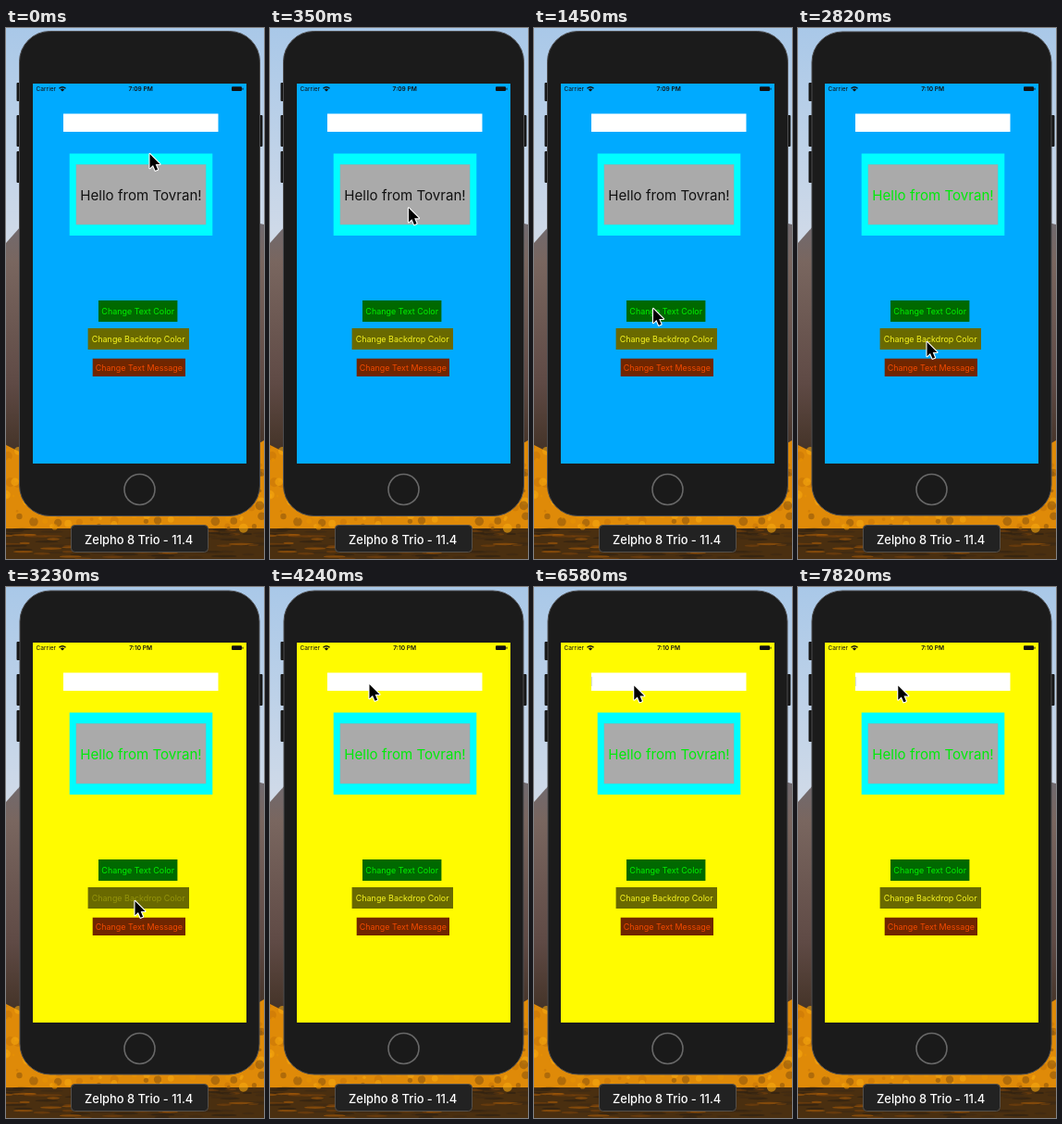
These frames come from a looping animation (279x573 px, 8 s). An HTML page:

```html
<!DOCTYPE html>
<html lang="en">
<head>
<meta charset="utf-8">
<title>Button demo</title>
<style>
  html, body { margin: 0; width: 100%; height: 100%; overflow: hidden; }
  svg { display: block; width: 279px; height: 573px; }
  text { font-family: Inter, "Open Sans", sans-serif; text-anchor: middle; }
  .button { font-size: 8.95px; }
  .status { font-size: 6.6px; }
</style>
</head>
<body>
<svg viewBox="0 0 279 573">
  <defs>
    <linearGradient id="sky" x2="0" y2="1">
      <stop offset="0" stop-color="#a9c8e8"/>
      <stop offset=".4" stop-color="#d0dae8"/>
    </linearGradient>
    <linearGradient id="hills" x2="0" y2="1">
      <stop offset="0" stop-color="#696d7b"/>
      <stop offset=".25" stop-color="#79665f"/>
      <stop offset=".7" stop-color="#5f4a45"/>
      <stop offset="1" stop-color="#3f2f22"/>
    </linearGradient>
  </defs>

  <rect width="279" height="573" fill="url(#sky)"/>
  <path d="M0 232L16 214L140 180L279 212V470H0Z" fill="url(#hills)"/>
  <path d="M0 450L16 458L260 456L279 445V573H0Z" fill="#df8a08"/>
  <rect y="540" width="279" height="33" fill="#4a2f10"/>
  <g id="foliage"></g>

  <g fill="#161616">
    <rect x="11.5" y="59" width="5" height="20" rx="1"/>
    <rect x="11.5" y="94" width="5" height="34" rx="1"/>
    <rect x="11.5" y="133" width="5" height="34" rx="1"/>
    <rect x="273" y="94" width="4.5" height="34" rx="1"/>
  </g>
  <rect id="body" rx="33" fill="#1b1b1b" stroke="#4c4c4e"/>
  <circle cx="144.5" cy="498" r="16.5" fill="#1a1a1a" stroke="#686868" stroke-width="1.6"/>

  <rect id="screen" x="29" y="60" width="231" height="410"/>
  <g class="status" fill="#111">
    <text x="32.5" y="68.3" style="text-anchor:start">Carrier</text>
    <text id="clock" x="145.7" y="68.3" font-weight="600"></text>
    <path d="M57 64.8Q61 61.4 65 64.8L64 65.8Q61 63.4 58 65.8ZM58.8 66.5Q61 64.7 63.2 66.5L61 68.6Z"/>
    <rect x="244" y="63.3" width="11" height="4.8" rx="1"/>
    <rect x="255.5" y="64.7" width="1" height="2"/>
  </g>

  <rect x="62" y="92.5" width="167.5" height="19.5" fill="#fff"/>
  <rect id="caret" x="62" y="97" width="1" height="10" fill="#7d96dc"/>

  <rect x="68.7" y="135.5" width="154.6" height="88.5" fill="#00fdff"/>
  <rect x="76" y="147.5" width="140" height="64.5" fill="#aaa" stroke="#8fb0b0" stroke-width=".6"/>
  <text id="hello" x="146" y="186" font-size="15.1">Hello from Tovran!</text>

  <g class="button">
    <rect x="100" y="294" width="85.4" height="23" fill="#006900"/>
    <text id="textButton" x="142.7" y="309.3" fill="#00f000">Change Text Color</text>
    <rect x="88.6" y="324" width="109.4" height="23" fill="#696900"/>
    <text id="backdropButton" x="143.2" y="339.3" fill="#f8f520">Change Backdrop Color</text>
    <rect x="93.7" y="356.7" width="100.3" height="19.3" fill="#702600"/>
    <text x="143.8" y="369.8" fill="#f24a00">Change Text Message</text>
  </g>

  <rect x="70.5" y="536.5" width="148" height="29" rx="4" fill="#222" stroke="#55504a"/>
  <text x="143.7" y="556.5" font-size="12.9" font-weight="500" fill="#fff">Zelpho 8 Trio - 11.4</text>

  <path id="pointer" d="M0 0V15.2L3.5 12 6 17.8 8.6 16.7 6.2 11H11Z" stroke="#fff" stroke-width="2.2" stroke-linejoin="round" paint-order="stroke"/>
</svg>
<script>
const LOOP = 8000;
const TEXT_CLICK = 1860, BACKDROP_CLICK = 3230, CARET_START = 6580;
const el = id => document.getElementById(id);
const set = (id, attrs) => {
  for (const name in attrs) el(id).setAttribute(name, attrs[name]);
};

const start = [155.5, 136];
const moves = [
  { from: 80, to: 790, at: [138.5, 315] },
  { from: 790, to: 1040, at: [118.5, 303] },
  { from: 1270, to: 1450, at: [129, 303] },
  { from: 2410, to: 2820, at: [139.5, 339] },
  { from: 3520, to: 4100, at: [113, 67] },
  { from: 4100, to: 4240, at: [107.5, 105] },
  { from: 4540, to: 4930, at: [108.3, 106.5] }
];

const ease = k => k * k * (3 - 2 * k);
const clamp = k => Math.min(1, Math.max(0, k));

function pointerAt(t) {
  return moves.reduce((point, { from, to, at }) => {
    const k = ease(clamp((t - from) / (to - from)));
    return point.map((value, axis) => value + (at[axis] - value) * k);
  }, start);
}

// A tapped title dims, then returns in two steps.
function titleOpacity(t, click) {
  const age = t - click;
  return age < 0 || age >= 320 ? 1 : age < 150 ? 0.3 : 0.7;
}

function caretOpacity(t) {
  const blink = Math.floor((t - CARET_START) / 310);
  return blink >= 0 && blink % 2 === 0 ? 0.35 : 0;
}

function growFoliage() {
  let seed = 11;
  const random = () => (seed = seed * 16807 % 2147483647) / 2147483647;
  const trees = ["#f7a80f", "#e89204", "#c97606", "#8f560c"];
  const water = ["#2c2013", "#3d2a14", "#7a430c", "#a85c08"];
  let blobs = "";
  for (let i = 0; i < 400; i++) {
    const x = random() * 279, y = 450 + random() * 123;
    const wet = y > 540;
    const rx = wet ? 5 + random() * 10 : 1 + random() * 4;
    const fill = (wet ? water : trees)[Math.floor(random() * 4)];
    blobs += `<ellipse cx="${x}" cy="${y}" rx="${rx}" ry="${wet ? 1.2 : rx}" fill="${fill}" opacity=".6"/>`;
  }
  el("foliage").innerHTML = blobs;
}

function draw(now) {
  const t = now % LOOP;
  const tapped = t >= TEXT_CLICK;
  const inset = tapped ? 1 : 0;
  set("body", {
    x: 14.5 + inset / 2, y: 3.5 + inset / 2, width: 260 - inset, height: 523 - inset
  });
  set("screen", { fill: t < BACKDROP_CLICK ? "#00aaff" : "#fffb00" });
  set("hello", { fill: tapped ? "#00ea0a" : "#111" });
  set("textButton", { opacity: titleOpacity(t, TEXT_CLICK) });
  set("backdropButton", { opacity: titleOpacity(t, BACKDROP_CLICK) });
  set("caret", { opacity: caretOpacity(t) });
  set("pointer", { transform: `translate(${pointerAt(t)})` });
  el("clock").textContent = tapped ? "7:10 PM" : "7:09 PM";
  requestAnimationFrame(draw);
}

growFoliage();
draw(performance.now());
</script>
</body>
</html>
```
